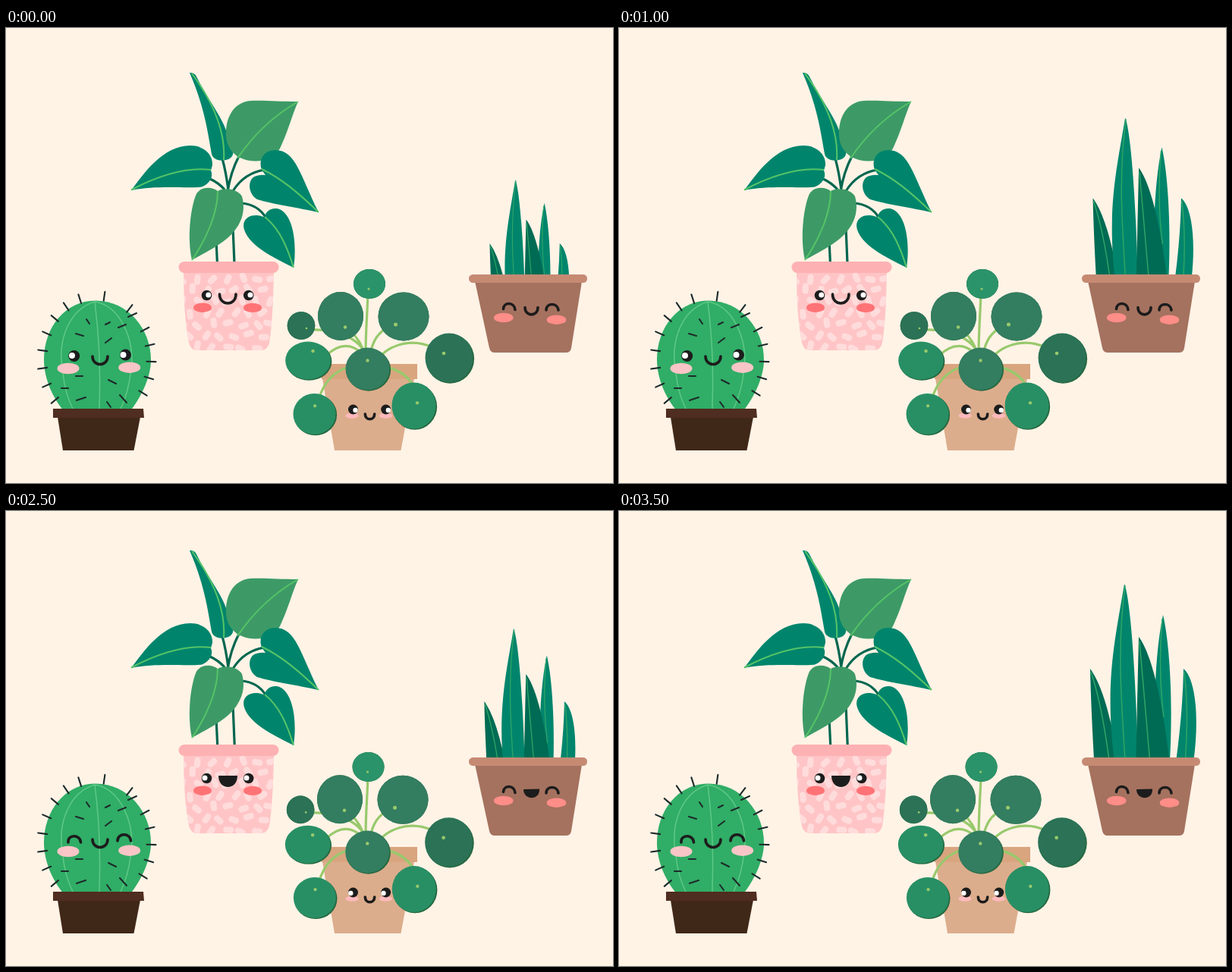
Write an HTML page that moves like this. It is 800 px wide and 600 px high and loops after 4000 ms.

```html
<!DOCTYPE html>
<html lang="en">
<head>
<meta charset="utf-8">
<title>Potted plants</title>
<style>
  html, body { margin: 0; width: 100%; height: 100%; overflow: hidden; background: #fff3e6; }
  svg { display: block; width: 800px; height: 600px; }
  .odd .a, svg:not(.odd) .b { display: none; }
  .odd #foliage { transform: translateY(-7px); }
  .line { fill: none; stroke: #1c1c1c; stroke-width: 3.6; stroke-linecap: round; }
  .ink { fill: #1c1c1c; }
  .white { fill: #fff; }
  .teal { fill: #00856c; }
  .deep { fill: #006b54; }
  .leaf { fill: #3d9a66; }
  .vein { fill: none; stroke: #56c467; stroke-width: 2; }
  .stem { fill: none; stroke: #00664f; stroke-width: 3.2; }
  .spine { fill: none; stroke: #1d2b2b; stroke-width: 2.1; stroke-linecap: round; }
</style>
</head>
<body>
<svg id="scene" viewBox="0 0 800 600">
  <defs>
    <clipPath id="aboveRim"><path d="M590 0H800V328H590Z"/></clipPath>
    <clipPath id="pinkBody"><path id="pinkShape" d="M234 320H353Q352 385 347 415Q345 425 335 425H253Q243 425 241 415Q234 380 234 320Z"/></clipPath>
  </defs>

  <g id="cactus">
    <path fill="#30ad66" d="M118 359.5C160 359.5 191 396 191 438C191 462 176 490 163 506H77C63 490 50 464 50 437C50 395 78 359.5 118 359.5Z"/>
    <path fill="none" stroke="#5cc884" stroke-width="1.6" d="M117 361C86 370 66 408 75 455C77 475 82 490 88 502M117 361C122 400 125 450 123 502M117 361C150 366 170 410 165 450C162 475 157 490 151 502"/>
    <path id="ring" class="spine"/>
    <path class="spine" d="M106 384l4 6M131 391l6-3M148 395l10-4M161 381l11-5M92 403l10 3M131 415l8-6M73 475h9M92 459h9M135 464l10 5M93 491l12-4M150 484l9 10M133 493l5 7"/>
    <path fill="#402818" d="M68 513H177L168.5 557H75Z"/>
    <path fill="#4f2d20" d="M62 502H181L182 514H62Z"/>
    <g class="a">
      <circle class="ink" cx="89.7" cy="432.5" r="7.5"/><circle class="white" cx="87" cy="432" r="4"/>
      <circle class="ink" cx="157.5" cy="431" r="7.5"/><circle class="white" cx="154.5" cy="431" r="4"/>
    </g>
    <path class="line b" d="M82 437C81 426 98 426 98.5 437M147 435C147 424 164 424 164.5 435"/>
    <path class="line" d="M114 433C114 447 134 447 134 433"/>
    <g fill="#fac5c6"><ellipse cx="82" cy="449" rx="14.5" ry="7.3"/><ellipse cx="162.7" cy="447.7" rx="14.5" ry="7.3"/></g>
  </g>

  <g id="foliage">
    <path class="stem" d="M285 172Q290 190 293 214M307 169Q296 190 292 216M269 199Q280 204 288 213M299 215Q314 191 341 187M309 231Q332 232 343 251M277 280L279 322M298.5 250L301.5 322"/>
    <path class="teal" d="M242 59Q249 58 252 66C265 92 286 120 290 135C297 148 302 163 298 169C293 177 273 177 271 166C266 138 262 105 242 59Z"/>
    <path class="vein" d="M245 60C265 87 290 130 287 174"/>
    <path class="leaf" d="M385 97C360 97 340 95 322 96C300 98 289 118 290 142C291 162 306 175 328 175.5C352 176 360 163 364 152C372 135 377 115 385 97Z"/>
    <path class="vein" d="M385 97C347 119 321 148 305 172"/>
    <path class="teal" d="M165 214C181 193 206 155 243 155C262 155 273 168 272 181L270 188C274 196 268 206 258 209.5C238 212 200 207 165 214Z"/>
    <path class="vein" d="M165 213.5C200 195 235 183 270 187"/>
    <path class="teal" d="M412 243C385 237 350 232 331 226C318 218 318 198 330 195Q337 193 342 194L337 187C332 172 341 161 355 161C382 161 388 195 412 243Z"/>
    <path class="vein" d="M337 186C362 198 384 216 412 243"/>
    <path class="leaf" d="M245 306C238 275 244 236 250 221C255 208 272 209 279 215C288 210 305 212 311 222C317 243 309 262 292 277C276 290 259 298 245 306Z"/>
    <path class="vein" d="M279 215C279 245 263 280 245 306"/>
    <path class="teal" d="M379 316C360 306 322 290 314 266C310 253 320 246 331 247Q338 248 341 250C341 243 348 237 357 238C378 242 384 283 379 316Z"/>
    <path class="vein" d="M341 249C361 265 371 290 379 316"/>
  </g>

  <g id="pinkPot">
    <use href="#pinkShape" fill="#ffc5c6"/>
    <g clip-path="url(#pinkBody)"><path id="flecks" stroke="#ffdcdc" stroke-width="8" stroke-linecap="round"/></g>
    <rect x="227.5" y="308" width="132" height="15" rx="7.5" fill="#fdb1b3"/>
    <g fill="#ff7376"><ellipse cx="259" cy="368.7" rx="12" ry="6.2"/><ellipse cx="325" cy="368.9" rx="12" ry="6.2"/></g>
    <g class="ink"><circle cx="264.5" cy="352.5" r="6.8"/><circle cx="319.7" cy="352.5" r="6.8"/></g>
    <g class="white a"><circle cx="266.8" cy="352" r="3.5"/><circle cx="322" cy="352" r="3.5"/></g>
    <g class="white b"><circle cx="262" cy="352" r="3.5"/><circle cx="317" cy="352" r="3.5"/></g>
    <path class="line a" d="M281.5 351C281.5 367 303 367 303 351"/>
    <path class="ink b" d="M280 349H305C305 369 280 369 280 349Z"/>
  </g>

  <g id="pilea">
    <path fill="#dcad8c" d="M417 462H538L520.5 557H433Z"/>
    <path fill="#d8a57f" d="M416 443H542V463H416Z"/>
    <g fill="#fdb9bb"><ellipse cx="456" cy="511.3" rx="8.7" ry="3.5"/><ellipse cx="500.5" cy="511.3" rx="8.7" ry="3.5"/></g>
    <g class="ink"><circle cx="457.5" cy="503" r="6.5"/><circle cx="500.7" cy="503" r="6.5"/></g>
    <g class="white a"><circle cx="460.5" cy="504" r="3.2"/><circle cx="503.8" cy="504" r="3.2"/></g>
    <g class="white b"><circle cx="454.3" cy="504" r="3.2"/><circle cx="497.5" cy="504" r="3.2"/></g>
    <path class="line" d="M473.3 509C473.3 518 485.7 518 485.7 509"/>
    <path fill="none" stroke="#98c96c" stroke-width="3.2" d="M474 430C474 400 476 380 477 350M473 432Q468 412 454 400M400 398C440 396 468 412 474 432M422 432Q446 409 468 428M480 430Q485 403 504 395M492 434C512 413 540 411 562 421M452 447C430 453 418 470 412 490M500 447Q526 452 537 472"/>
    <g id="discs"></g>
  </g>

  <g id="snake">
    <g clip-path="url(#aboveRim)"><g id="blades">
      <path class="deep" d="M621 208Q634 226 644 263L665 345H627Q622 260 621 208Z"/>
      <path class="teal" d="M666 96C674 115 682 220 684 345H655C638 230 654 170 666 96Z"/>
      <path class="teal" d="M717 137C726 175 731 260 725 345H708C704 260 706 190 717 137Z"/>
      <path class="deep" d="M685 166C702 188 718 255 727 345H681Q683 250 685 166Z"/>
      <path class="teal" d="M744 208C761 222 766 280 755 345H732Q743 270 744 208Z"/>
      <path fill="none" stroke="#2fa566" stroke-width="1.5" d="M622 212Q638 260 648 345M667 98C656 180 662 250 668 345M716 142Q710 210 718 272M686 172Q692 240 701 345M745 212Q752 270 745 345"/>
    </g></g>
    <path fill="#a5725f" d="M618 334H759L745 422Q744 428 738 428H644Q638.5 428 637 422Z"/>
    <rect x="610" y="325" width="156" height="11" rx="5.5" fill="#c68a73"/>
    <path class="line" d="M655.5 370.5C656 361 670 361 671 371.5M712 372C712 362 727 362 728 372"/>
    <path class="line a" d="M684 368.5C684 381 701 381 701 368.5"/>
    <path class="ink b" d="M682 367L703 366.5C704 382 682 382 682 367Z"/>
    <g fill="#ff8d88"><ellipse cx="655.7" cy="382" rx="12.8" ry="6.2"/><ellipse cx="725.5" cy="384.7" rx="12.8" ry="6.2"/></g>
  </g>
</svg>
<script>
const $ = id => document.getElementById(id);

// A short dash centred on a point, turned by an angle in radians.
function dash(x, y, angle, half) {
  const dx = half * Math.cos(angle), dy = half * Math.sin(angle);
  return `M${x - dx} ${y - dy}L${x + dx} ${y + dy}`;
}

// Spines stand out from the cactus, angles in degrees clockwise from the top.
function spines(from, step, count) {
  let d = '';
  for (let i = 0; i < count; i++) {
    const t = (from + step * i) * Math.PI / 180;
    d += dash(119.5 + 72 * Math.sin(t), 437 - 84 * Math.cos(t), t - Math.PI / 2, 6);
  }
  return d;
}
$('ring').setAttribute('d', spines(-130, 16, 8) + spines(8, 29, 2) + spines(62, 15, 5));

let seed = 7;
const random = () => (seed = seed * 16807 % 2147483647) / 2147483647;

// Flecks on a staggered, jittered grid.
let flecks = '';
for (let row = 0; row < 7; row++) {
  for (let col = 0; col < 7; col++) {
    flecks += dash(232 + col * 19 + row % 2 * 9 + random() * 6,
      328 + row * 15 + random() * 5, random() * Math.PI, 3);
  }
}
$('flecks').setAttribute('d', flecks);

const discs = [];
function disc(x, y, rx, ry, color, dotX, dotY) {
  const shade = y > 400 ? 1.2 : 0;
  $('discs').insertAdjacentHTML('beforeend', `<g>
    <ellipse cx="${x + shade}" cy="${y + shade}" rx="${rx + shade / 3}" ry="${ry}" fill="#25673e"/>
    <ellipse cx="${x}" cy="${y}" rx="${rx}" ry="${ry}" fill="${color}"/>
    <circle cx="${x + dotX}" cy="${y + dotY}" r="${rx * .075}" fill="#98c96c"/></g>`);
  // High discs lean left, outer discs sag.
  discs.push({
    node: $('discs').lastElementChild,
    leanX: (y - 470) * .011,
    sagY: 1.7 * ((x - 480) / 100) ** 2
  });
}
const bright = '#288f65', muted = '#337d60', dark = '#2b7256';
disc(479, 337.5, 21, 19.5, '#2b9369', -1, 6.5);
disc(441, 380, 30, 32, muted, 6, 14.5);
disc(524, 380.5, 33.5, 32, muted, -10.5, 10.5);
disc(389, 392.5, 18.3, 18.3, dark, 7, 3.5);
disc(398, 438.5, 29.8, 25, bright, 6.5, -12.5);
disc(584, 435, 31.5, 32.5, dark, -7, -6);
disc(476.5, 449.5, 29, 28, muted, 0, -11);
disc(406.5, 509, 28, 27, bright, 0.6, -10.7);
disc(537.5, 498, 29, 30.5, bright, 4.5, -3.7);

function draw(now) {
  const step = Math.floor(now / 500) % 4;
  const odd = step % 2;
  const growth = 1 - .25 * (1 - step / 3) ** 1.4;
  $('scene').classList.toggle('odd', odd === 1);
  $('blades').setAttribute('transform',
    `translate(687 512) scale(${growth}) translate(-687 -512)`);
  for (const { node, leanX, sagY } of discs) {
    node.setAttribute('transform', `translate(${leanX * odd} ${sagY * odd})`);
  }
}

function tick() {
  draw(performance.now());
  requestAnimationFrame(tick);
}
tick();
</script>
</body>
</html>
```
